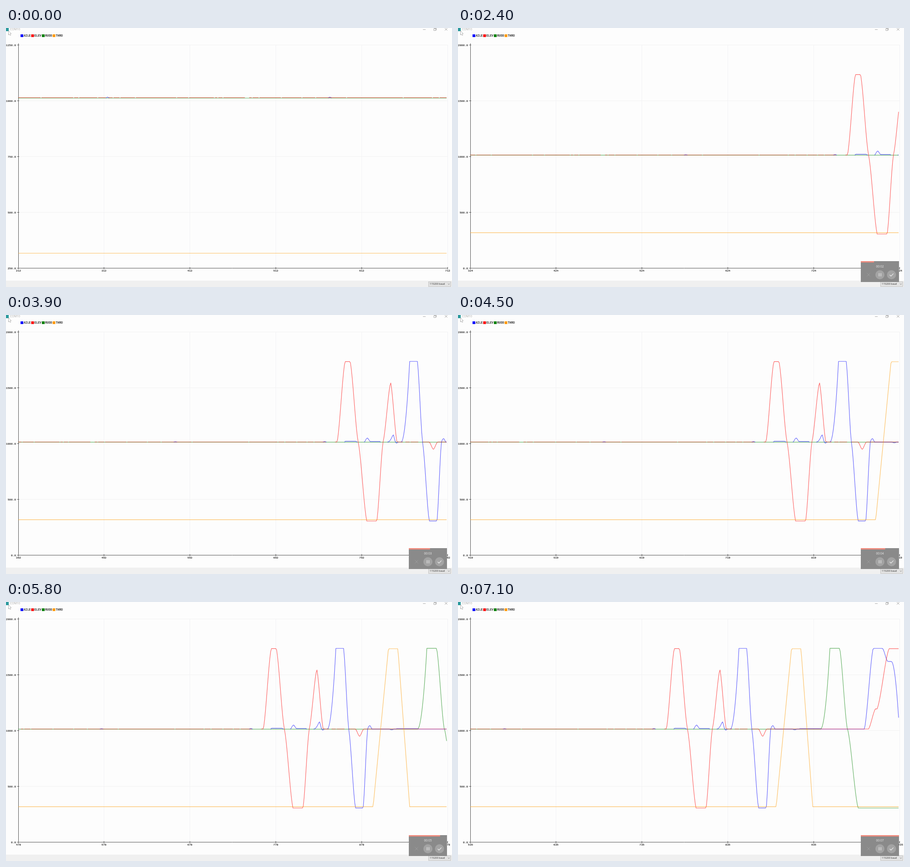
Recreate the animation shown at these times as an HTML page with a canvas. Size 981x571 px, loop 7200 ms.

```html
<!DOCTYPE html>
<html lang="en">
<head>
<meta charset="utf-8">
<title>Serial plotter</title>
<style>
  html, body { margin: 0; width: 981px; height: 571px; overflow: hidden; background: #fdfdfd; }
  canvas { display: block; }
</style>
</head>
<body>
<canvas id="stage" width="981" height="571"></canvas>
<script>
const ctx = document.getElementById('stage').getContext('2d');
const LOOP = 7200, STEP = 100;
const LEFT = 27, RIGHT = 971, TOP = 37, BOTTOM = 529.5, SAMPLES = 500;
const SCALE_X = (RIGHT - LEFT) / SAMPLES;
const MONO = '"Liberation Mono", monospace', SANS = '"Open Sans", sans-serif';
const COLORS = { AILE: '#0000ff', ELEV: '#ff0000', RUDD: '#008000', THRO: '#ff9900' };

const linear = u => u;
const soft = u => (u + u * u * (3 - 2 * u)) / 2;
const quick = u => u * u;
const hash = n => { const v = Math.sin(n * 127.1) * 43758.5453; return v - Math.floor(v); };
const ramp = (s, from, to, ease) => ease(Math.min(1, Math.max(0, (s - from) / (to - from))));

// A stick leaves its rest position, moves by size, holds and returns
const move = (from, to, size, ease = soft) => s => size * ramp(s, from, to, ease);
const hold = (from, reach, leave, to, size, ease = soft) => s =>
  size * (ramp(s, from, reach, ease) - ramp(s, leave, to, ease === quick ? soft : ease));
const bump = (center, half, size) => hold(center - half, center, center, center + half, size);

// Resting samples that lie under another trace are skipped
const series = [
  {
    name: 'RUDD', rest: 1011.4, hidden: () => false,
    moves: [hold(943, 954, 965.4, 974.3, 724, quick), move(974.6, 986.8, -706)]
  },
  {
    name: 'AILE', rest: 1012, hidden: s => s < 890,
    moves: [
      bump(316, 2, 4), bump(575, 2, 4), bump(749, 2, 6),
      hold(772, 773, 785, 787, 8), hold(795, 797, 813, 814, 6), bump(798.6, 3.4, 33),
      hold(822, 828.7, 828.7, 831.5, 70, quick), bump(832.7, 1.5, -10),
      hold(838, 848, 857, 863, 723, quick), hold(863, 870.8, 879.8, 885, -706),
      hold(885, 886.5, 888, 890, 30), bump(913, 3, -6), hold(918, 919, 943, 944, 4),
      move(994.2, 1004.3, 723), move(1015.4, 1021.2, -117), move(1025.5, 1034, -503, quick)
    ]
  },
  {
    name: 'ELEV', rest: 1013.4,
    hidden: s => hash(s >> 1) < (s < 747 ? 0.1 : s < 763 ? 0.7 : s < 834 ? 1 : s < 871 ? 0.5 : 0),
    moves: [
      hold(763.5, 772.6, 778.7, 788, 720), hold(788, 798, 809.7, 817, -708),
      hold(817, 825.8, 825.8, 833.2, 536), bump(875.6, 4.8, -68),
      move(999, 1007, 180), move(1009, 1022.8, 539)
    ]
  },
  {
    name: 'THRO', rest: 317, hidden: () => false,
    moves: [hold(891.4, 909.2, 920.3, 934, 1415, linear)]
  }
];

const valueAt = (trace, s) => trace.moves.reduce((sum, m) => sum + m(s), trace.rest);

// Sampling runs slightly ahead at the start and slows down over time
function firstSample(t) {
  const sec = t / 1000;
  return Math.floor(214.3 + 46.3 * sec - 0.14 * sec * sec - 2.2 * Math.exp(-4 * sec));
}

function line(color, width, ...xy) {
  ctx.strokeStyle = color;
  ctx.lineWidth = width;
  ctx.beginPath();
  for (let i = 0; i < xy.length; i += 2) ctx.lineTo(xy[i], xy[i + 1]);
  ctx.stroke();
}

function rect(color, x, y, w, h) {
  ctx.fillStyle = color;
  ctx.fillRect(x, y, w, h);
}

function disc(color, x, y, r) {
  ctx.fillStyle = color;
  ctx.beginPath();
  ctx.arc(x, y, r, 0, 7);
  ctx.fill();
}

function text(str, x, y, font, color, align = 'left') {
  ctx.font = font;
  ctx.fillStyle = color;
  ctx.textAlign = align;
  ctx.textBaseline = 'middle';
  ctx.fillText(str, x, y);
}

function cross(color, x, y, r) {
  line(color, 0.8, x - r, y - r, x + r, y + r);
  line(color, 0.8, x - r, y + r, x + r, y - r);
}

function drawWindow() {
  rect('#fdfdfd', 0, 0, 981, 571);
  rect('#2b9a9e', 0, 0, 6, 7);
  text('COM10', 9, 3.5, '6.4px ' + SANS, '#a8a8a8');
  line('#999', 0.8, 917, 3.5, 923, 3.5);
  ctx.strokeRect(941, 1.5, 4.2, 4.2);
  line('#999', 0.8, 942.5, 1.5, 942.5, 0.3, 946.7, 0.3, 946.7, 4.4, 945.2, 4.4);
  cross('#999', 968, 3, 2.8);

  ctx.fillStyle = '#fff';
  line('#444', 0.8, 5.5, 6, 5.5, 15, 7.5, 13.2, 9, 16.2, 10.2, 15.6, 8.8, 12.7, 11.2, 12.5, 5.5, 6);
  ctx.fill();

  Object.entries(COLORS).forEach(([name, color], i) => {
    const x = 32 + i * 23.5;
    rect(color, x, 14, 6, 6);
    text(name, x + 7, 17.2, 'bold 6.4px ' + MONO, '#333');
  });

  rect('#f0f0f0', 0, 557, 981, 14);
  rect('#e4e4e4', 929, 559, 50, 11);
  ctx.strokeStyle = '#b8b8b8';
  ctx.strokeRect(929.5, 559.5, 49, 10.5);
  text('115200 baud', 932, 564.5, '5.5px ' + SANS, '#222');
  line('#666', 0.8, 972, 563.5, 974, 565.5, 976, 563.5);
}

function drawAxes(first, low, high) {
  const font = 'bold 6.1px ' + MONO;
  const rowY = i => Math.floor(TOP + i * (BOTTOM - TOP) / 4) + 0.5;
  const columnX = i => Math.floor(LEFT + i * 100 * SCALE_X) + 0.5;
  for (let i = 0; i <= 4; i++) line('#f2f2f2', 1, LEFT, rowY(i), RIGHT, rowY(i));
  for (let i = 0; i <= 5; i++) line('#f2f2f5', 1, columnX(i), TOP, columnX(i), BOTTOM);
  line('#555', 1, 27.5, 34, 27.5, 532);
  line('#555', 1, 24, BOTTOM, RIGHT, BOTTOM);
  for (let i = 0; i <= 4; i++) {
    line('#555', 1, 24.5, rowY(i), 29, rowY(i));
    text((high - i * (high - low) / 4).toFixed(1), 22, rowY(i) + 0.5, font, '#333', 'right');
  }
  for (let i = 0; i <= 5; i++) {
    line('#555', 1, columnX(i), 527, columnX(i), 532);
    text(first + i * 100, columnX(i), 535.5, font, '#333', 'center');
  }
}

function drawTrace(trace, first, low, high) {
  ctx.strokeStyle = COLORS[trace.name];
  ctx.beginPath();
  let wasHidden = true;
  for (let i = 0; i < SAMPLES; i++) {
    const v = valueAt(trace, first + i);
    const x = LEFT + i * SCALE_X;
    const y = BOTTOM - (v - low) / (high - low) * (BOTTOM - TOP);
    const hidden = Math.abs(v - trace.rest) < 0.01 && trace.hidden(first + i);
    if (i === 0 || (hidden && wasHidden)) ctx.moveTo(x, y);
    else ctx.lineTo(x, y);
    wasHidden = hidden;
  }
  ctx.stroke();
}

function drawRecorder(t) {
  rect('#8a8a8a', 886, 514, 84, 46);
  rect('#ec8b7e', 886, 514, 84 * (t + STEP) / LOOP, 3);
  text('00:0' + Math.floor(t / 1000), 928, 526, '6.6px ' + SANS, '#eee', 'center');
  cross('#a0a0a0', 903, 544, 3.5);
  disc('#a3a3a3', 928, 544, 10);
  line('#eee', 1.2, 926.3, 540.5, 926.3, 547.5);
  line('#eee', 1.2, 930.2, 540.5, 930.2, 547.5);
  disc('#a3a3a3', 953.5, 544, 10);
  line('#eee', 1.2, 949.5, 544.3, 952.3, 547, 957.8, 541.3);
}

function draw(now) {
  const t = Math.floor(now % LOOP / STEP) * STEP;
  const first = firstSample(t);
  const [low, high] = t < 1200 ? [250, 1250] : [0, 2000];
  drawWindow();
  drawAxes(first, low, high);
  ctx.globalAlpha = 0.6;
  ctx.lineJoin = 'round';
  ctx.lineWidth = 1.15;
  for (const trace of series) drawTrace(trace, first, low, high);
  ctx.globalAlpha = 1;
  if (t > 0) drawRecorder(t);
  requestAnimationFrame(draw);
}
requestAnimationFrame(draw);
</script>
</body>
</html>
```
